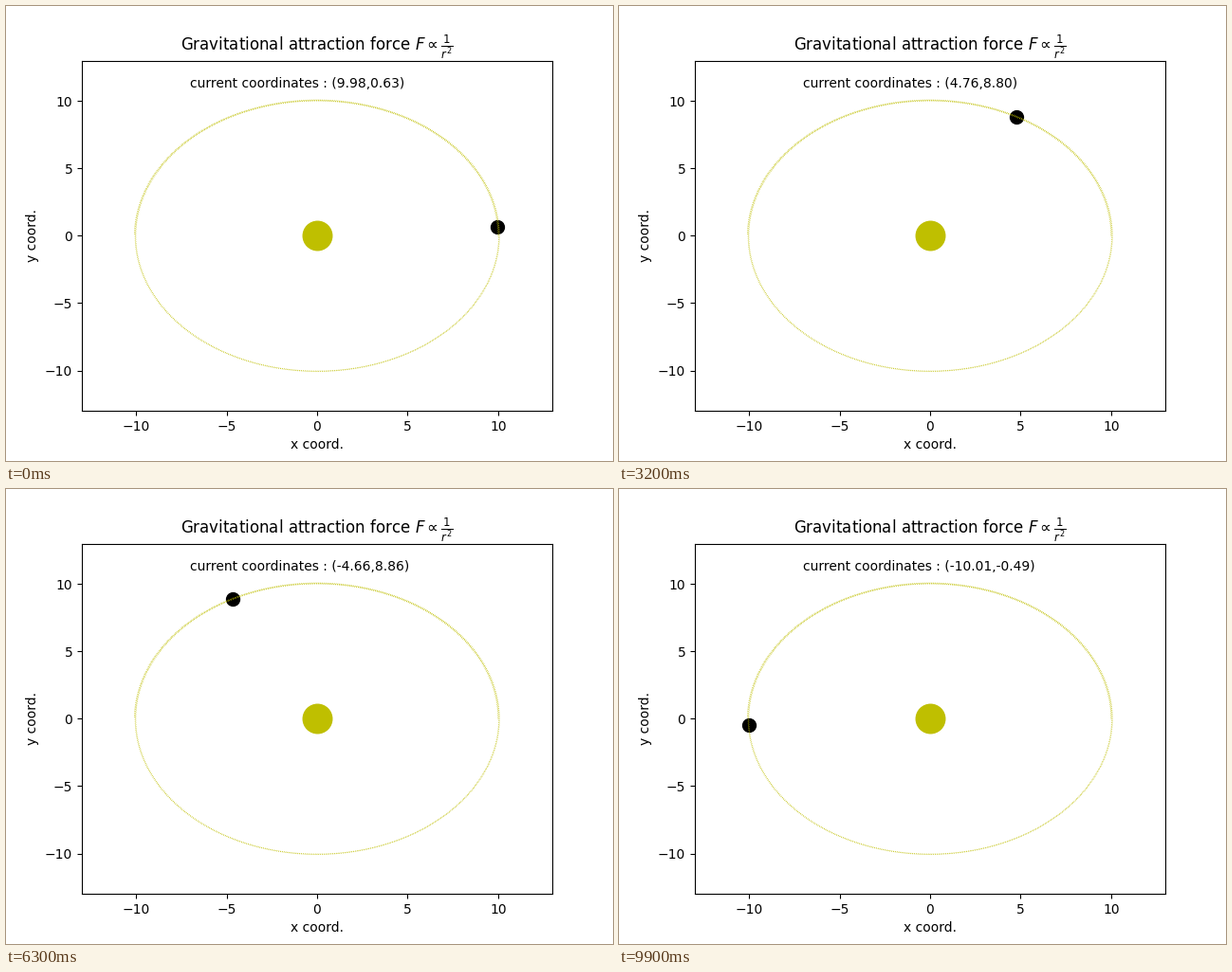
A matplotlib script for the animation above (10000 ms loop, 640x480 px).

```python
import numpy as np
import matplotlib.pyplot as plt
from matplotlib.animation import FuncAnimation

FRAMES = 100
DT = 0.01
STEPS = 50000          # length of the drawn trajectory
STRIDE = 100           # integration steps per frame
START = 200            # step shown first


def integrate(x, y, vx, vy):
    """Explicit Euler orbit in a unit 1/r^2 field; it drifts slowly outwards."""
    path = np.empty((STEPS, 2))
    for i in range(STEPS):
        path[i] = x, y
        r3 = (x * x + y * y) ** 1.5
        ax_, ay_ = -x / r3, -y / r3
        x, y = x + vx * DT, y + vy * DT
        vx, vy = vx + ax_ * DT, vy + ay_ * DT
    return path


orbit = integrate(10.0, 0.0, 0.0, np.sqrt(0.1))

fig, ax = plt.subplots(figsize=(6.4, 4.8), dpi=100)
ax.set(xlim=(-13, 13), ylim=(-13, 13), xlabel="x coord.", ylabel="y coord.")
ax.set_title(r"Gravitational attraction force $F \propto \frac{1}{r^2}$")

ax.plot([0], [0], "yo", markersize=22)
planet, = ax.plot([], [], "ko", markersize=10)
ax.plot(orbit[:, 0], orbit[:, 1], "y:", linewidth=0.5)
label = ax.text(-7, 11, "")


def update(i):
    x, y = orbit[START + STRIDE * i]
    planet.set_data([x], [y])
    label.set_text(f"current coordinates : ({x:.2f},{y:.2f})")
    return planet, label


anim = FuncAnimation(fig, update, frames=FRAMES, interval=100,
                     repeat=True, repeat_delay=0, blit=False)
plt.show()
```
